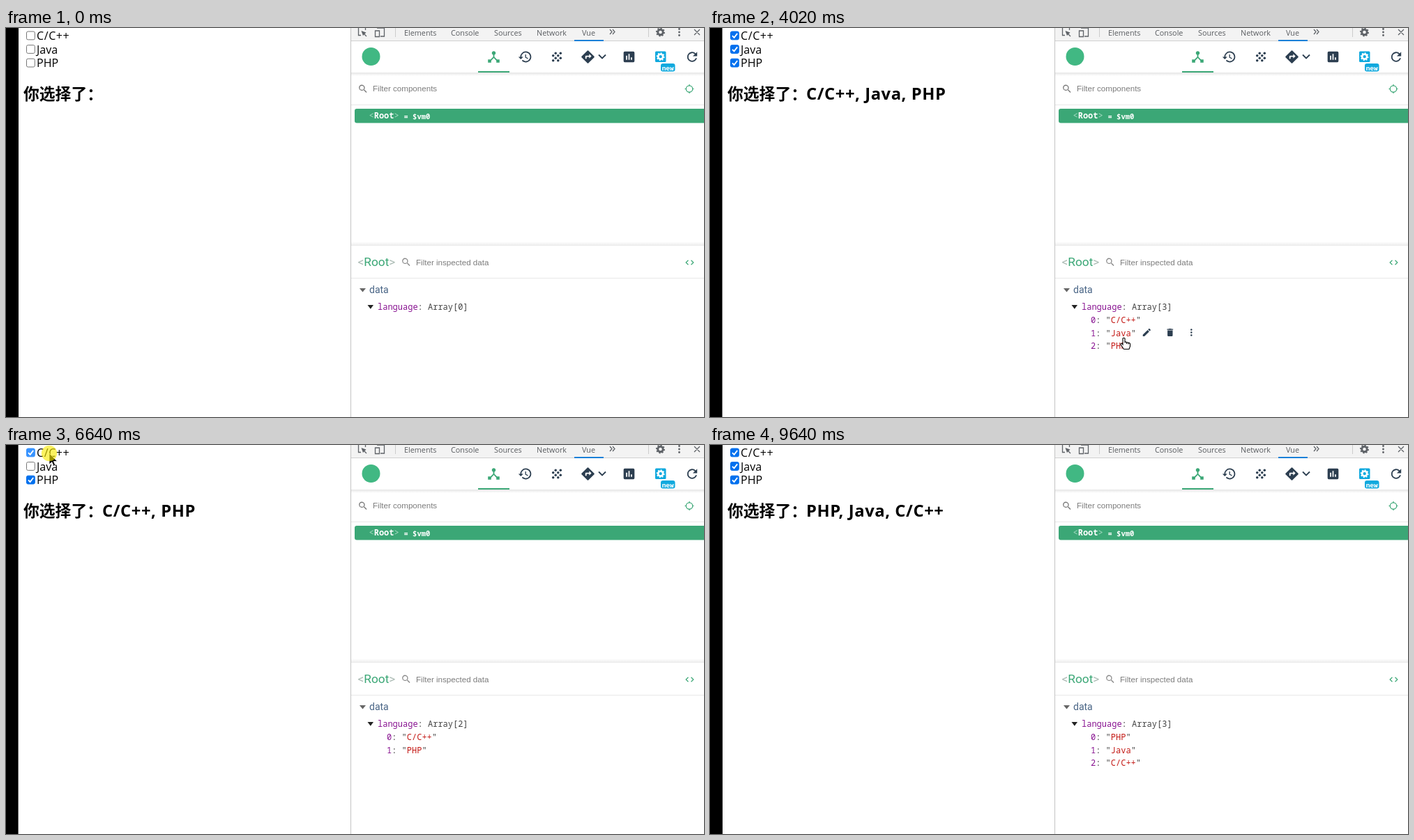
An HTML page for the animation above (9.81 s loop, 1001 by 559 pixels).

```html
<!DOCTYPE html>
<html lang="zh">
<head>
<meta charset="utf-8">
<title>Checkbox binding</title>
<style>
html, body { margin: 0; width: 100%; height: 100%; overflow: hidden; background: #fff; }
svg { display: block; width: 100vw; height: 100vh; }
text { white-space: pre; }
.label { font: 16px "Open Sans", "Noto Sans", sans-serif; }
.title { font: bold 22.8px "Noto Sans CJK SC", "Noto Sans CJK", sans-serif; }
.picked { font: bold 23.7px "Open Sans", "Noto Sans", sans-serif; letter-spacing: .6px; }
.tab { font: 10.8px "Open Sans", sans-serif; fill: #5a5d61; }
.filter { font: 11.6px "Liberation Sans", Arial, sans-serif; fill: #7c7c7c; }
.mono { font: 12px "Noto Sans Mono", monospace; fill: #444; }
.heading { font: 17.3px Roboto, sans-serif; fill: #3ba776; }
.key { fill: #881391; }
.string { fill: #c41a16; }
.faint { fill: #a9b9b2; }
</style>
</head>
<body>
<svg id="stage" viewBox="0 0 1001 559" preserveAspectRatio="none">
  <defs>
    <linearGradient id="up" x1="0" y1="1" x2="0" y2="0">
      <stop offset="0" stop-opacity=".08"/><stop offset="1" stop-opacity="0"/>
    </linearGradient>
    <linearGradient id="down" x1="0" y1="0" x2="0" y2="1">
      <stop offset="0" stop-opacity=".1"/><stop offset="1" stop-opacity="0"/>
    </linearGradient>
  </defs>
  <rect width="1001" height="559" fill="#fff"/>
  <rect width="17" height="559"/>
  <rect id="edge" x="17" width="1" height="559"/>
  <g id="boxes"></g>
  <text class="title" x="25" y="103">你选择了：</text>
  <text class="picked" id="picked" x="138" y="103"></text>

  <!-- developer tools -->
  <rect x="494" width="1" height="559" fill="#c4c4c4"/>
  <rect x="495" width="506" height="18" fill="#f3f3f3"/>
  <rect x="495" y="18" width="506" height="1" fill="#d0d0d0"/>
  <g fill="none" stroke="#5f6368" stroke-width="1.3">
    <path d="M509 10.500h-3.500V0M515.500 0v3M512 7l5 5"/>
    <path d="M509.500 4l7 2.500-4.500 4.500z" fill="#5f6368" stroke="none"/>
    <path d="M532 0h10.500v12H537M529.500 4h6v8.500h-6z"/>
    <path d="M866 2l3 3.500-3 3.500M870 2l3 3.500-3 3.500M987 2l8 8M995 2l-8 8"/>
    <path d="M558.500 0v13M921.500 0v13" stroke="#ccc" stroke-width="1"/>
  </g>
  <g id="tabs"></g>
  <rect x="815" y="17" width="42" height="2" fill="#1a80d8"/>
  <rect x="495" y="64" width="506" height="5" fill="url(#down)"/>
  <circle cx="523.5" cy="41" r="13" fill="#41b883"/>
  <rect x="677" y="62" width="45" height="2" fill="#3ba776"/>
  <g id="icons"></g>
  <path d="M850 38.500l5 5 5-5" fill="none" stroke="#2c3e50" stroke-width="1.800"/>
  <rect x="939" y="51" width="20.500" height="11.500" rx="3" fill="#10a9de"/>
  <text x="949.2" y="60.500" text-anchor="middle" fill="#fff" style="font:bold 9.500px 'Noto Sans Mono',monospace">new</text>

  <text class="filter" x="526" y="91">Filter components</text>
  <g fill="none" stroke="#3ba776" stroke-width="1.200">
    <circle cx="980" cy="87.500" r="4.700"/>
    <path d="M980 81v2M980 92v2M973.500 87.500h2M984.500 87.500h2"/>
  </g>
  <path d="M495 110.500h506M495 359.500h506" stroke="#e8e8e8"/>
  <rect x="500" y="116" width="504" height="20.500" rx="3" fill="#3ba776"/>
  <text class="mono" x="520.500" y="130" style="font-weight:bold;fill:#fff"><tspan fill="#a8dcc4" font-weight="400">&lt;</tspan>Root<tspan fill="#a8dcc4" font-weight="400">&gt;</tspan></text>
  <text class="mono" x="570.500" y="130.500" style="font-size:10.500px;font-weight:bold;fill:#fff">= $vm0</text>

  <rect x="495" y="307" width="506" height="6" fill="url(#up)"/>
  <text class="heading" x="504.500" y="342"><tspan class="faint">&lt;</tspan>Root<tspan class="faint">&gt;</tspan></text>
  <text class="filter" x="588" y="341">Filter inspected data</text>
  <path d="M507 374h9l-4.500 5.500z" fill="#666"/>
  <text x="521" y="380.500" fill="#486485" style="font:14px Roboto,sans-serif">data</text>
  <path d="M518.500 398h8.500l-4.200 5.800z" fill="#222"/>
  <text class="mono" x="533" y="405"><tspan class="key">language</tspan>: Array[<tspan id="count">0</tspan>]</text>
  <g id="rows"></g>
  <g id="actions" fill="#2c3e50"></g>

  <g id="cursor">
    <path id="arrow" d="M0 0V16L3.800 12.500 6.300 18.200 8.800 17.100 6.400 11.600H11.600z" stroke="#fff" stroke-width=".8"/>
    <path id="hand" d="M0 1.200Q1.500-.8 3 1.200V6.500Q4.500 5.500 5.600 7 7 6.200 8 7.500 9.700 7 10.500 8.700V12.500L9 16.500H1.500L-3 10Q-3.500 8-1.700 8.200L0 10zM5.600 7v2M8 7.500v2" fill="#fff" stroke="#000" stroke-width="1.100"/>
    <circle id="press" r="11.200" fill="#f8ea00" opacity=".62"/>
  </g>
</svg>
<script>
const LOOP = 9810;
const LANGUAGES = ["C/C++", "Java", "PHP"];
const $ = id => document.getElementById(id);

// Screen refreshes: start, end, number of steps
const BURSTS = [
  [140, 530, 6], [680, 1220, 8], [1390, 1540, 3], [1690, 2010, 5], [2640, 3020, 6],
  [3480, 4400, 13], [4480, 5400, 13], [5480, 6020, 8], [6340, 7260, 13],
  [7410, 7800, 6], [7950, 8180, 4], [8350, 8350, 1], [8500, 8950, 7], [9640, 9640, 1]
];
// Pointer path: time, x, y
const PATH = [
  [62, 935, 590], [530, 152, 75], [600, 152, 75], [1220, 62, 7], [1540, 63, 9],
  [1850, 63, 9], [2010, 63, 35], [2790, 63, 35], [3020, 65, 54], [3550, 65, 54],
  [4016, 592, 445], [4400, 517, 411], [5400, 52, 31], [5790, 52, 31], [6020, 54, 34],
  [6330, 54, 34], [6560, 62, 12], [6650, 62, 12], [6950, 63, 47], [7490, 63, 47],
  [7800, 63, 31], [8030, 63, 31], [8180, 64, 10], [8350, 64, 10], [8875, 820, 532]
];
// Clicks: press, release, checkbox
const CLICKS = [
  [1690, 1850, 0], [2640, 2790, 1], [3480, 3550, 2], [5480, 5780, 1], [6560, 6640, 0],
  [7020, 7100, 2], [7250, 7410, 2], [7950, 8020, 1], [8170, 8350, 0]
];
const SHAPES = {
  tree: "M17 16l-4-4V8.820C14.160 8.400 15 7.300 15 6c0-1.660-1.340-3-3-3S9 4.340 9 6c0 1.300.840 2.400 2 2.820V12l-4 4H3v5h5v-3.050l4-4.200 4 4.200V21h5v-5z",
  history: "M13 3a9 9 0 0 0-9 9H1l4 4 4-4H6a7 7 0 1 1 2.060 4.940l-1.420 1.420A9 9 0 1 0 13 3zm-1 5v5l4.280 2.540.720-1.210-3.500-2.080V8z",
  route: "M21.700 11.300l-9-9a1 1 0 0 0-1.400 0l-9 9a1 1 0 0 0 0 1.400l9 9a1 1 0 0 0 1.400 0l9-9a1 1 0 0 0 0-1.400zM14 14.500V12h-4v3H8v-4a1 1 0 0 1 1-1h5V7.500l3.500 3.500z",
  chart: "M19 3H5a2 2 0 0 0-2 2v14a2 2 0 0 0 2 2h14a2 2 0 0 0 2-2V5a2 2 0 0 0-2-2zM9 17H7v-7h2zm4 0h-2V7h2zm4 0h-2v-4h2z",
  refresh: "M17.650 6.350A8 8 0 1 0 19.730 14h-2.080A6 6 0 1 1 16.220 7.780L13 11h7V4z",
  search: "M15.500 14h-.8l-.3-.3a6.500 6.500 0 1 0-.7.700l.3.300v.8l5 5 1.500-1.500zm-6 0a4.500 4.500 0 1 1 0-9 4.500 4.500 0 0 1 0 9z",
  code: "M9.400 16.600L4.800 12l4.600-4.600L8 6l-6 6 6 6zm5.200 0l4.600-4.600-4.600-4.600L16 6l6 6-6 6z",
  edit: "M3 17.250V21h3.750L17.810 9.940l-3.750-3.750zM20.710 7.040a1 1 0 0 0 0-1.410l-2.340-2.340a1 1 0 0 0-1.410 0l-1.830 1.830 3.750 3.750z",
  bin: "M6 19a2 2 0 0 0 2 2h8a2 2 0 0 0 2-2V7H6zM19 4h-3.500l-1-1h-5l-1 1H5v2h14z"
};

const icon = (name, x, y, scale, fill) =>
  `<path d="${SHAPES[name]}" fill="${fill}" transform="translate(${x} ${y}) scale(${scale}) translate(-12 -12)"/>`;
const dot = (x, y, r, fill) => `<circle cx="${x}" cy="${y}" r="${r}" fill="${fill}"/>`;
const dots = (x, y, gap, r, fill) => [-1, 0, 1].map(i => dot(x, y + i * gap, r, fill)).join("");
const gear = (x, y, r, color) => `<g fill="none" stroke="${color}" transform="translate(${x} ${y})">
  <circle r="${r * .6}" stroke-width="${r * .46}"/>
  <circle r="${r * .88}" stroke-width="${r * .3}" pathLength="16" stroke-dasharray="1 1"/></g>`;

function drawStatic() {
  const tabs = [["Elements", 571], ["Console", 638], ["Sources", 700], ["Network", 761], ["Vue", 826]];
  $("tabs").innerHTML = tabs.map(([name, x]) => `<text class="tab" x="${x}" y="10.500">${name}</text>`).join("");

  const dark = "#2c3e50";
  let grain = "";
  for (let row = 0; row < 4; row++)
    for (let col = (row + 1) % 2; col < 4; col += 2)
      grain += dot(784.700 + col * 3.530, 36.200 + row * 3.530, 1.760, dark);
  $("icons").innerHTML = grain +
    icon("tree", 699.500, 41.500, .92, "#3ba776") +
    icon("history", 744.500, 41.500, .88, dark) +
    icon("route", 834.500, 41.500, .93, dark) +
    icon("chart", 893.500, 41.500, .87, dark) +
    `<rect x="931" y="33.500" width="15.500" height="15.500" rx="1.500" fill="#10a9de"/>` +
    gear(938.700, 41.200, 5.800, "#fff") +
    icon("refresh", 984, 41.500, .9, dark) +
    icon("search", 512, 87.500, .65, "#777") +
    icon("search", 574, 336.500, .65, "#888") +
    icon("code", 980.500, 337, .62, "#3ba776") +
    gear(938.500, 6, 6.300, "#5f6368") + dots(965.500, 6, 4.500, 1.400, "#5f6368");

  $("boxes").innerHTML = LANGUAGES.map((name, i) => {
    const y = 5 + i * 19.600;
    return `<rect id="box${i}" x="29.500" y="${y}" width="11.800" height="11.800" rx="2"/>
      <path id="tick${i}" d="M32 ${y + 6.200}l2.600 2.600 4.600-6" fill="none" stroke="#fff" stroke-width="1.900"/>
      <text class="label" x="44" y="${17 + i * 19.600}"${i ? "" : ' letter-spacing=".6"'}>${name}</text>`;
  }).join("");
}

function snap(t) {
  let last = 0;
  for (const [start, end, steps] of BURSTS) {
    if (t < start) break;
    const step = (end - start) / Math.max(1, steps - 1);
    last = t >= end ? end : start + Math.floor((t - start) / step + 1e-6) * step;
  }
  return last;
}

function pointerAt(t) {
  const next = PATH.findIndex(key => key[0] > t);
  if (next < 1) return next ? PATH.at(-1).slice(1) : PATH[0].slice(1);
  const [t0, x0, y0] = PATH[next - 1], [t1, x1, y1] = PATH[next];
  const u = (t - t0) / (t1 - t0), ease = u * u * (3 - 2 * u);
  return [x0 + (x1 - x0) * ease, y0 + (y1 - y0) * ease];
}

function selectionAt(t) {
  let list = [];
  for (const [, release, i] of CLICKS)
    if (t >= release) list = list.includes(i) ? list.filter(j => j !== i) : [...list, i];
  return list;
}

const show = (id, on) => $(id).setAttribute("visibility", on ? "visible" : "hidden");

function render(time) {
  const t = snap(time);
  const [x, y] = pointerAt(t);
  const visible = t >= 140 && t < 8950;
  const pressed = CLICKS.some(([from, to]) => t >= from && t < to);
  const selected = selectionAt(t);
  const names = selected.map(i => LANGUAGES[i]);

  const hovered = visible && x > 28 && x < 96 ? Math.floor((y - 1) / 19.600) : -1;
  LANGUAGES.forEach((_, i) => {
    const on = selected.includes(i), hot = hovered === i, box = $("box" + i);
    const blue = hot ? (pressed ? "#3793ff" : "#005cc8") : "#0070ee";
    box.setAttribute("fill", on ? blue : "#fff");
    box.setAttribute("stroke", on ? blue : hot ? "#4f4f4f" : "#767676");
    show("tick" + i, on);
  });

  $("edge").setAttribute("fill", t < 1690 || t >= 9640 ? "#000" : "#666");
  $("picked").textContent = names.join(", ");
  $("count").textContent = names.length;
  $("rows").innerHTML = names.map((name, i) =>
    `<text class="mono" x="546" y="${424 + i * 18.700}"><tspan class="key">${i}</tspan>: "<tspan class="string">${name}</tspan>"</text>`
  ).join("");

  const row = visible && x > 530 ? Math.floor((y - 410) / 18.700) : -1;
  let actions = "";
  if (names[row]) {
    const end = 567.600 + (names[row].length + 2) * 7.200, mid = 437.500 + (row - 1) * 18.700;
    actions = icon("edit", end + 15.500, mid, .62, "#2c3e50") +
      icon("bin", end + 49, mid, .62, "#2c3e50") + dots(end + 79.500, mid, 3.900, 1.250, "#2c3e50");
  }
  $("actions").innerHTML = actions;

  const hand = x > 500 && y > 392 && y < 466;
  $("cursor").setAttribute("transform", `translate(${x.toFixed(1)} ${y.toFixed(1)})`);
  show("arrow", visible && !hand);
  show("hand", visible && hand);
  show("press", visible && pressed);
}

drawStatic();
const began = performance.now();
function loop() {
  render((performance.now() - began) % LOOP);
  requestAnimationFrame(loop);
}
loop();
</script>
</body>
</html>
```
